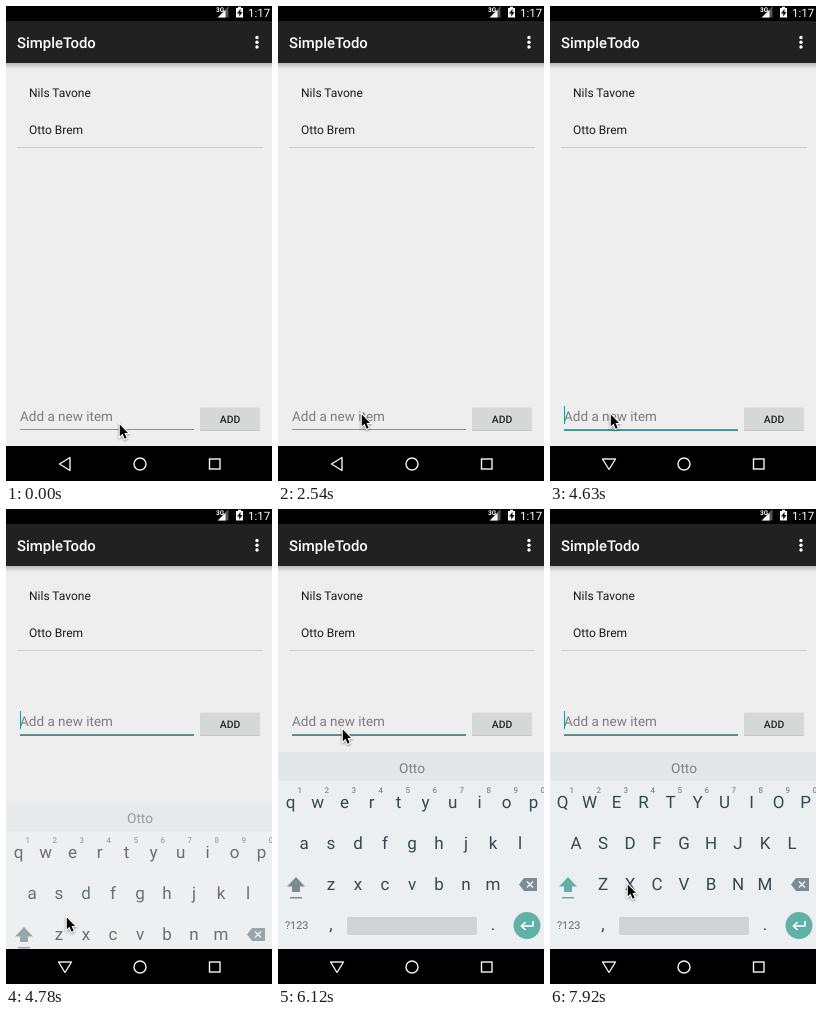
An HTML page that plays this animation: 266x475 px, repeating every 8000 ms.

```html
<!DOCTYPE html>
<html lang="en">
<head>
<meta charset="utf-8">
<title>SimpleTodo</title>
<style>
html, body { margin: 0; width: 100%; height: 100%; overflow: hidden; background: #eee; }
svg {
  display: block; width: 266px; height: 475px;
  font-family: Roboto, sans-serif; text-rendering: geometricPrecision;
}
.mid { text-anchor: middle; }
.item { font-size: 12px; fill: #1a1a1a; }
.key { font-size: 17px; fill: #37474f; text-anchor: middle; }
.digit { font-size: 8px; fill: #66737a; text-anchor: middle; }

/* One loop is 8 s, so 1% is 80 ms. */
#pointer, #form, #board, #caret, #focus, #back, #lower, #upper, #shift {
  animation: 8s step-end infinite;
}
#pointer { animation-name: pointer; filter: drop-shadow(0 1px 1px rgba(0, 0, 0, .4)); }
#form { animation-name: form; }
#board { animation-name: board; }
#caret { animation-name: caret; }
#focus { animation-name: focus; }
#back { animation-name: back; transform-origin: 59px 458px; }
#lower { animation-name: lower; }
#upper { animation-name: upper; }
#shift { animation-name: shift; }

@keyframes pointer {
  0% { transform: translate(113px, 417px); }
  3.75% { transform: translate(107px, 413px); }
  5.625% { transform: translate(91px, 405px); }
  7.5% { transform: translate(84px, 403px); }
  11.125% { transform: translate(84px, 404px); }
  18.625% { transform: translate(84px, 405px); }
  29.875% { transform: translate(83px, 406px); }
  31.75% { transform: translate(83px, 407px); }
  33.625% { transform: translate(82px, 407px); }
  46.75% { transform: translate(81px, 407px); }
  48.5% { transform: translate(69px, 407px); }
  50.375% { transform: translate(60px, 407px); }
  63.375% { transform: translate(62px, 300px); }
  65.25% { transform: translate(64px, 219px); }
  82.125% { transform: translate(67px, 240px); }
  84% { transform: translate(78px, 320px); }
  85.875%  { transform: translate(84px, 375px); }
  89.625% { transform: translate(52px, 375px); }
  91.5% { transform: translate(19px, 375px); }
  97.125% { transform: translate(46px, 375px); }
  99%, 100% { transform: translate(77px, 374px); }
}
@keyframes form {
  0% { transform: none; }
  59.75%, 100% { transform: translateY(-198px); }
}
@keyframes board {
  0% { transform: translateY(232px); opacity: 0; }
  59.75% { transform: translateY(50px); opacity: .75; }
  61.625%, 100% { transform: none; opacity: 1; }
}
@keyframes caret {
  0%, 63.375%, 76.5%, 89.625% { opacity: 0; }
  56%, 69%, 82.125%, 95.25%, 100% { opacity: 1; }
}
@keyframes focus {
  0% { opacity: 0; }
  56%, 100% { opacity: 1; }
}
@keyframes back {
  0% { transform: none; }
  57.875%, 100% { transform: rotate(-90deg); }
}
@keyframes lower {
  0% { opacity: 1; }
  95.25%, 100% { opacity: 0; }
}
@keyframes upper {
  0% { opacity: 0; }
  95.25%, 100% { opacity: 1; }
}
@keyframes shift {
  0% { fill: #7f8b91; }
  95.25%, 100% { fill: #5fb0a7; }
}
</style>
</head>
<body>
<svg viewBox="0 0 266 475">
  <defs>
    <linearGradient id="shade" x2="0" y2="1">
      <stop stop-color="#000" stop-opacity=".22"/>
      <stop offset="1" stop-color="#000" stop-opacity="0"/>
    </linearGradient>
  </defs>
  <rect width="266" height="475" fill="#eee"/>

  <!-- Status and action bars -->
  <rect width="266" height="15"/>
  <rect y="15" width="266" height="42" fill="#212121"/>
  <rect y="57" width="266" height="6" fill="url(#shade)"/>
  <g fill="#fff">
    <path d="M211 11.500L222.500 0V11.500Z" fill="#555"/>
    <path d="M212 11.500L219.500 4V11.500Z"/>
    <text x="210" y="6" font-size="6.500" font-weight="700">3G</text>
    <path d="M230 2H232V.8H235V2H237V11.500H230Z"/>
    <path d="M234.500 2.800L231 7.500H233.200V10.700L236.500 6H234.500Z" fill="#111"/>
    <text x="242" y="10.500" font-size="11.500">1:17</text>
    <text x="11" y="41.500" font-size="14.900" font-weight="500">SimpleTodo</text>
    <circle cx="251" cy="31.500" r="1.700"/>
    <circle cx="251" cy="36.300" r="1.700"/>
    <circle cx="251" cy="41" r="1.700"/>
  </g>

  <!-- List -->
  <text class="item" x="23" y="91">Nils Tavone</text>
  <text class="item" x="23" y="128">Otto Brem</text>
  <rect x="11" y="141" width="246" height="1" fill="#cfcfcf"/>

  <!-- Entry form -->
  <g id="form">
    <text x="14" y="414.500" font-size="13.500" fill="#7c7c7c">Add a new item</text>
    <rect x="14" y="423" width="174" height="1" fill="#919191"/>
    <rect id="focus" x="14" y="423.500" width="174" height="1.500" fill="#37988e"/>
    <rect id="caret" x="14" y="400" width="1" height="18" fill="#26968a"/>
    <rect x="194" y="402.500" width="60" height="22.500" rx="1.500" fill="#c4c4c4"/>
    <rect x="194" y="401.500" width="60" height="22.500" rx="1.500" fill="#d6d7d7"/>
    <text class="mid" x="224" y="416.500" font-size="10.400" font-weight="500" fill="#222">ADD</text>
  </g>

  <!-- Keyboard -->
  <g id="board">
    <rect y="243" width="266" height="197" fill="#eceff1"/>
    <rect y="243" width="266" height="29" fill="#e4e7e9"/>
    <text class="mid" x="134" y="263.500" font-size="13.700" fill="#788186">Otto</text>
    <g id="digits"></g>
    <g id="lower"></g>
    <g id="upper"></g>
    <path id="shift" d="M18 368L27 377.500H22V383H14V377.500H9ZM12 388H24V389.500H12Z"/>
    <path d="M241 375.500L246 369H259V382H246Z" fill="#7f8b91"/>
    <path d="M249 372.500L255 378.500M255 372.500L249 378.500" stroke="#eceff1" stroke-width="1.500"/>
    <text x="7" y="420" font-size="10.800" fill="#5d696f">?123</text>
    <text class="key" x="53" y="421">,</text>
    <text class="key" x="215" y="421">.</text>
    <rect x="69" y="408" width="130" height="18" rx="2" fill="#d0d3d4"/>
    <circle cx="249" cy="416.500" r="13.500" fill="#62b1a8"/>
    <path d="M255 412V417H243.500M247.500 413L243.500 417L247.500 421" fill="none" stroke="#fff" stroke-width="1.600"/>
  </g>

  <!-- Navigation bar -->
  <rect y="440" width="266" height="35"/>
  <g fill="none" stroke="#f4f4f4" stroke-width="1.400">
    <path id="back" d="M53.500 458L64 451.500V464.500Z" stroke-linejoin="round"/>
    <circle cx="134" cy="458" r="6"/>
    <rect x="203.500" y="453" width="10.500" height="10"/>
  </g>

  <path id="pointer" d="M.8 1.500V13.300L3.500 10.800L5.700 15.700L7.600 14.800L5.500 9.900H9Z"
    stroke="#fff" stroke-width="2.200" paint-order="stroke"/>
</svg>
<script>
const rows = [["qwertyuiop", 12.6, 299], ["asdfghjkl", 26, 340], ["zxcvbnm", 53, 381]];
const pitch = 27;

function label(parent, text, x, y, kind) {
  const el = document.createElementNS("http://www.w3.org/2000/svg", "text");
  el.setAttribute("x", x);
  el.setAttribute("y", y);
  el.setAttribute("class", kind);
  el.textContent = text;
  document.getElementById(parent).append(el);
}

for (const [keys, left, y] of rows) {
  [...keys].forEach((key, i) => {
    const x = left + i * pitch;
    label("lower", key, x, y, "key");
    label("upper", key.toUpperCase(), x, y, "key");
  });
}
[..."1234567890"].forEach((digit, i) => label("digits", digit, 21.7 + i * pitch, 284, "digit"));
</script>
</body>
</html>
```
